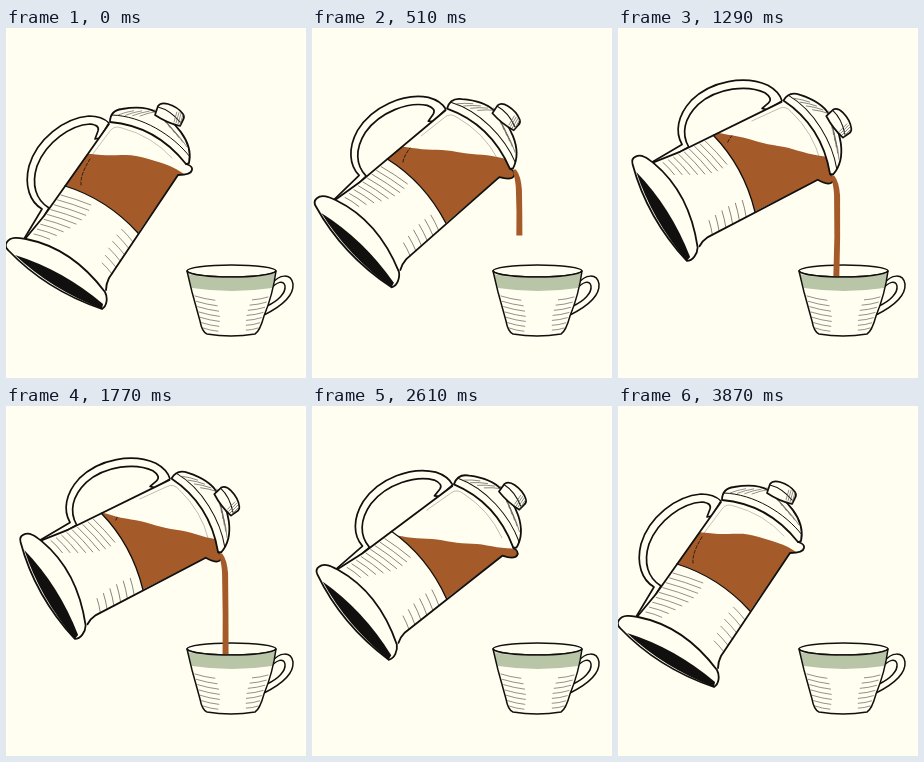
Animation, 300 px wide and 350 px high, one loop 3.9 s. Source, as an HTML page with a canvas:

```html
<!DOCTYPE html>
<html lang="en">
<head>
<meta charset="utf-8">
<title>Pouring coffee</title>
<style>
  html, body { margin: 0; width: 100%; height: 100%; overflow: hidden; background: #fffef1; }
  canvas { display: block; width: 300px; height: 350px; }
</style>
</head>
<body>
<canvas id="stage" width="300" height="350"></canvas>
<script>
const ctx = document.getElementById('stage').getContext('2d');
const LOOP = 3900;
const PAPER = '#fffef1', INK = '#11100e', PENCIL = '#66645b', COFFEE = '#a45b29', GREEN = '#b8c6a7';
const PIVOT = { x: 172, y: 206 };
const MAX_TILT = 28.6 * Math.PI / 180;
const POUR = 400, STOP = 2330, UPRIGHT = 3030;

// Pot, drawn in its resting pose
const pot = {
  body: new Path2D('M104 94 L38 188 L20 211 Q66 220 100 262 L172 147 L186 142 L180 136Z'),
  sides: new Path2D('M103 96 L38 188 L19 211 M180 136 Q187 138 186 142 Q185 147 172 147 L103 250 Q100 256 100 262'),
  coffee: new Path2D('M104 94 Q150 98 180 136 L186 140 L185 145 L172 147 L132 205 Q101 171 59 158Z'),
  plunger: new Path2D('M59 158 Q101 171 132 205'),
  glass: new Path2D('M86 127 L104 103 Q108 97 116 100 Q146 108 166 130'),
  glint: new Path2D('M84 131 Q74 147 75 157'),
  lid: new Path2D('M104 94 C104 86 108 82 116 81 Q138 77 150 84 C167 91 188 113 183 135 L180 136 Q150 98 104 94Z'),
  lidLine: new Path2D('M106 87 C136 88 167 107 184 129'),
  knob: new Path2D('M152 78 Q155 74 162 76 Q172 79 177 86 Q179 89 177 92 L174 98 Q161 95 149 87Z'),
  knobLine: new Path2D('M152 79 Q164 82 174 94'),
  handle: new Path2D('M103 95 Q96 88 83 88 C58 90 31 111 23 138 C18 158 24 174 36 181 L18 211 L24 211 L43 180 C30 172 25 157 31 138 C40 114 65 97 84 96 Q94 97 92 103 L89 111 L94 110Z'),
  flange: new Path2D('M1 214 C5 208 14 210 20 211 Q66 220 99 264 C102 270 101 278 96 281 Q40 262 2 222 Q-2 218 1 214Z'),
  sole: new Path2D('M9 227 Q57 242 97 276 L96 281 Q45 261 9 227Z')
};

const cup = {
  front: new Path2D('M181 243 C186 251 264 251 270 243 Q267 266 258 288 Q254 303 249 306 Q225 310 201 306 Q196 304 194 293 L186 264Z'),
  band: new Path2D('M182 246 C196 251 255 251 270 245 L266 260 Q226 266 186 260Z'),
  handle: new Path2D('M266 256 C273 246 285 245 287 256 C288 268 276 278 258 287 L261 278 C272 273 280 265 279 258 C278 252 271 253 264 262Z')
};

const clamp = v => Math.max(0, Math.min(1, v));
const ease = v => (1 - Math.cos(Math.PI * clamp(v))) / 2;
const wobble = i => Math.sin(i * 12.9 + 1);

function stroke(path, width, color = INK) {
  ctx.lineWidth = width;
  ctx.strokeStyle = color;
  ctx.stroke(path);
}

function fill(path, color) {
  ctx.fillStyle = color;
  ctx.fill(path);
}

function outlined(path, width) {
  fill(path, PAPER);
  stroke(path, width);
}

// Short bowed strokes of uneven length, spaced along a segment
function hatch(n, x0, y0, x1, y1, dx, dy, bow) {
  const path = new Path2D();
  for (let i = 0; i < n; i++) {
    const k = i / (n - 1), s = 1 + 0.5 * wobble(i);
    const x = x0 + (x1 - x0) * k, y = y0 + (y1 - y0) * k;
    path.moveTo(x, y);
    path.quadraticCurveTo(x + dx * s / 2, y + dy * s / 2 - bow, x + dx * s, y + dy * s);
  }
  stroke(path, 0.7, PENCIL);
}

function poseAt(t) {
  const p = ease(t / 1000) * (1 - ease((t - 2310) / 720));
  const arc = Math.sin(Math.PI * p);
  return { p, angle: p * MAX_TILT, dx: 0.5 * arc - 0.5 * p, dy: 1.5 * arc - 2.5 * p };
}

function applyPose(pose) {
  ctx.translate(PIVOT.x + pose.dx, PIVOT.y + pose.dy);
  ctx.rotate(pose.angle);
  ctx.translate(-PIVOT.x, -PIVOT.y);
}

function place(pose, x, y) {
  const c = Math.cos(pose.angle), s = Math.sin(pose.angle);
  const rx = x - PIVOT.x, ry = y - PIVOT.y;
  return { x: PIVOT.x + pose.dx + rx * c - ry * s, y: PIVOT.y + pose.dy + rx * s + ry * c };
}

// The level sinks while pouring, then the pot fills up again before the loop closes
function surfaceAt(t, p) {
  const drained = clamp((t - POUR) / (UPRIGHT - POUR)) * (1 - clamp((t - UPRIGHT) / (LOOP - UPRIGHT)));
  const level = 128 - 21 * p * p + 19 * drained;
  const slope = 0.03 + 0.2 * p * p;
  const sag = 0.005 * (1 - drained) * (1 - p) ** 3;
  const phase = t / LOOP * Math.PI * 12;
  return x => level + slope * (x - 140) + sag * Math.max(0, x - 120) ** 2 + 0.5 * Math.sin(x * 0.14 + phase);
}

function drawCoffee(pose, t) {
  const surface = surfaceAt(t, pose.p);
  ctx.save();
  applyPose(pose);
  ctx.clip(pot.coffee);
  ctx.setTransform(1, 0, 0, 1, 0, 0);
  ctx.beginPath();
  ctx.moveTo(40, 350);
  for (let x = 40; x <= 230; x += 5) ctx.lineTo(x, surface(x));
  ctx.lineTo(230, 350);
  ctx.closePath();
  ctx.fillStyle = COFFEE;
  ctx.fill();
  ctx.clip();
  applyPose(pose);
  ctx.setLineDash([3, 2]);
  stroke(pot.glint, 0.8);
  ctx.restore();
}

function drawPot(pose, t) {
  ctx.save();
  applyPose(pose);
  outlined(pot.handle, 1.7);
  fill(pot.body, PAPER);
  stroke(pot.glass, 0.7, '#aaa99f');
  ctx.restore();

  drawCoffee(pose, t);

  ctx.save();
  applyPose(pose);
  hatch(9, 55, 167, 28, 206, 21, 7, 1);
  hatch(6, 127, 214, 106, 246, -8, -9, 1);
  stroke(pot.plunger, 1.3);
  stroke(pot.sides, 1.8);

  outlined(pot.flange, 1.8);
  fill(pot.sole, INK);

  outlined(pot.lid, 1.8);
  stroke(pot.lidLine, 1);
  hatch(6, 181, 119, 160, 95, -9, -11, 2);
  hatch(4, 112, 87, 134, 88, 11, -3, 1);
  outlined(pot.knob, 1.7);
  stroke(pot.knobLine, 1.1);
  hatch(4, 168, 94, 174, 97, 2, -7, 0);
  ctx.restore();
}

function drawStream(pose, t) {
  if (t < POUR) return;
  const tip = place(pose, 185, 143);
  const top = tip.y - 7 + Math.max(0, t - STOP) * 0.55;
  const end = Math.min(251, tip.y + (t - POUR) * 0.53);
  if (end <= top) return;
  const sway = 1.5 * Math.sin((t - 840) / 930 * 3 * Math.PI - Math.PI / 2);
  const x = tip.x, foot = x + 5 + sway;
  const bend = Math.min(top + 20, (top + end) / 2);
  const mid = (bend + end) / 2;
  ctx.beginPath();
  ctx.moveTo(x, top);
  ctx.quadraticCurveTo(x + 3, bend - 6, x + 3, bend);
  ctx.quadraticCurveTo(x + 4, mid, foot - 3, end);
  ctx.lineTo(foot + 3, end);
  ctx.quadraticCurveTo(x + 9.5, mid, x + 9, bend);
  ctx.quadraticCurveTo(x + 8, top + 6, x + 3, top);
  ctx.fillStyle = COFFEE;
  ctx.fill();
}

function drawCupBack() {
  const rim = new Path2D();
  rim.ellipse(225.5, 243, 44.5, 6, 0, 0, Math.PI * 2);
  outlined(rim, 1.5);
}

function drawCupFront() {
  outlined(cup.handle, 1.5);
  fill(cup.front, PAPER);
  fill(cup.band, GREEN);
  hatch(7, 189, 268, 197, 300, 14, 3, -1);
  hatch(7, 262, 269, 252, 300, -11, 2, -1);
  stroke(cup.front, 1.5);
}

function draw(t) {
  const pose = poseAt(t);
  ctx.fillStyle = PAPER;
  ctx.fillRect(0, 0, 300, 350);
  drawCupBack();
  drawPot(pose, t);
  drawStream(pose, t);
  drawCupFront();
}

ctx.lineCap = ctx.lineJoin = 'round';
const start = performance.now();
function tick() {
  draw((performance.now() - start) % LOOP);
  requestAnimationFrame(tick);
}
tick();
</script>
</body>
</html>
```
